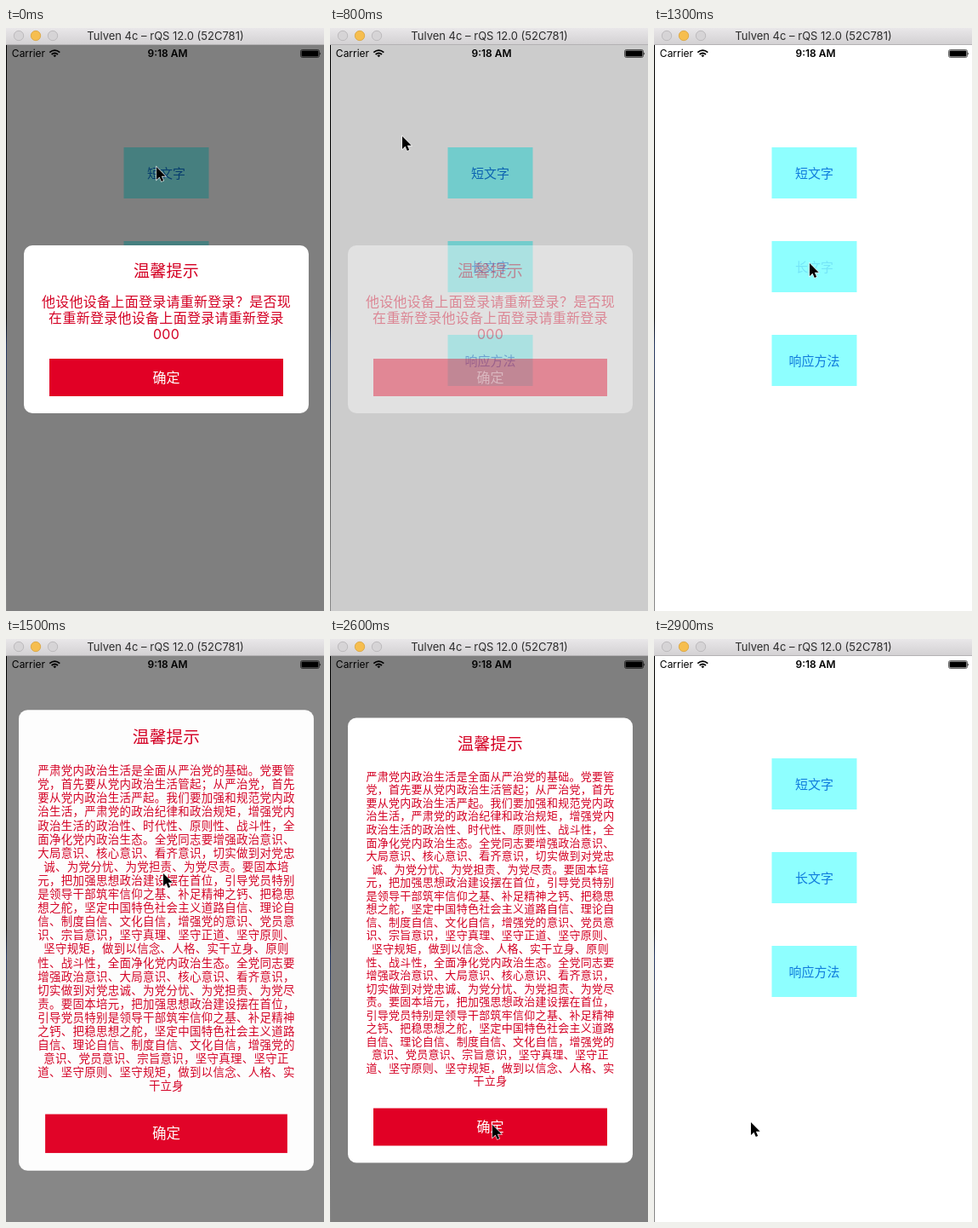
Write an HTML page that moves like this. It is 374x684 px and loops after 3000 ms.

```html
<!DOCTYPE html>
<html lang="zh-CN">
<head>
<meta charset="utf-8">
<style>
  html, body { margin: 0; width: 374px; height: 684px; overflow: hidden; background: #fff; }
  svg { display: block; }
  text { font-family: Inter, "Noto Sans CJK SC", "Noto Sans CJK", sans-serif; text-anchor: middle; }
  .box > * { opacity: var(--alpha); }
</style>
</head>
<body>
<svg id="stage" width="374" height="684" viewBox="0 0 374 684"></svg>
<script>
const LOOP = 3000, STEP = 100, CX = 188.5, CY = 353.5;

const shortText = `他设他设备上面登录请重新登录？是否现
在重新登录他设备上面登录请重新登录
000`;

const longText = `严肃党内政治生活是全面从严治党的基础。党要管
党，首先要从党内政治生活管起；从严治党，首先
要从党内政治生活严起。我们要加强和规范党内政
治生活，严肃党的政治纪律和政治规矩，增强党内
政治生活的政治性、时代性、原则性、战斗性，全
面净化党内政治生态。全党同志要增强政治意识、
大局意识、核心意识、看齐意识，切实做到对党忠
诚、为党分忧、为党担责、为党尽责。要固本培
元，把加强思想政治建设摆在首位，引导党员特别
是领导干部筑牢信仰之基、补足精神之钙、把稳思
想之舵，坚定中国特色社会主义道路自信、理论自
信、制度自信、文化自信，增强党的意识、党员意
识、宗旨意识，坚守真理、坚守正道、坚守原则、
坚守规矩，做到以信念、人格、实干立身、原则
性、战斗性，全面净化党内政治生态。全党同志要
增强政治意识、大局意识、核心意识、看齐意识，
切实做到对党忠诚、为党分忧、为党担责、为党尽
责。要固本培元，把加强思想政治建设摆在首位，
引导党员特别是领导干部筑牢信仰之基、补足精神
之钙、把稳思想之舵，坚定中国特色社会主义道路
自信、理论自信、制度自信、文化自信，增强党的
意识、党员意识、宗旨意识，坚守真理、坚守正
道、坚守原则、坚守规矩，做到以信念、人格、实
干立身`;

const rect = (x, y, w, h, fill, extra = '') =>
  `<rect x="${x}" y="${y}" width="${w}" height="${h}" fill="${fill}" ${extra}/>`;
const label = (str, x, cy, size, fill, extra = '') =>
  `<text x="${x}" y="${cy + size * 0.37}" font-size="${size}" fill="${fill}" ${extra}>${str}</text>`;
const light = (x, fill, stroke) =>
  `<circle cx="${x}" cy="9" r="5.7" fill="${fill}" stroke="${stroke}" stroke-width=".8"/>`;

const button = (str, y, id) =>
  rect(138.5, y, 100, 60, '#8effff') + label(str, CX, y + 30, 15, '#0f7bdc', `id="${id}"`);

function dialog(id, top, text, firstLine, pitch, size) {
  const bottom = 2 * CY - top, red = '#d40024';
  const lines = text.split('\n').map((line, i) =>
    label(line, CX, firstLine + i * pitch, size, red, 'letter-spacing=".28"')).join('');
  return `<g id="${id}" class="box">` +
    rect(21, top, 335, bottom - top, '#fff', 'rx="10"') +
    label('温馨提示', CX, top + 30, 19, red, 'letter-spacing=".2"') + lines +
    rect(51, bottom - 64, 275, 44, '#e10025') +
    label('确定', CX, bottom - 42, 16, '#fff') + '</g>';
}

const stage = document.getElementById('stage');
stage.innerHTML = `
  <defs>
    <linearGradient id="bar" x2="0" y2="1"><stop stop-color="#e9e7e9"/><stop offset="1" stop-color="#d2d0d2"/></linearGradient>
    <linearGradient id="edge" x2="0" y2="1"><stop offset=".48" stop-color="#000"/><stop offset=".53" stop-color="#24365f"/>
      <stop offset=".7" stop-color="#555"/><stop offset="1" stop-color="#888"/></linearGradient>
  </defs>
  ${rect(0, 0, 374, 684, '#fff')}
  ${button('短文字', 140, 'b1')}${button('长文字', 250, 'b2')}${button('响应方法', 360, 'b3')}
  <g id="shade">${rect(1, 20, 373, 664, '#000')}</g>
  ${rect(0, 20, 1, 664, 'url(#edge)')}
  ${rect(0, 0, 374, 20, 'url(#bar)')}${rect(0, 19, 374, 1, '#b4b2b4')}
  ${light(15, '#d6d4d6', '#b5b3b5')}${light(35, '#f6be4f', '#d9a23c')}${light(55, '#d6d4d6', '#b5b3b5')}
  ${label('Tulven 4c – rQS 12.0 (52C781)', 187.5, 9.3, 13, '#2c2c2c')}
  ${label('Carrier', 26.5, 30, 12, '#000')}
  ${label('9:18 AM', 190, 30, 12, '#000', 'font-weight="600"')}
  <g fill="none" stroke="#000" stroke-width="1.7">
    <path d="M51.3 28.6q6-5 12 0M53.6 31q3.7-3 7.4 0"/>
    <path d="M55.4 32.3q1.9-1.5 3.8 0l-1.9 2z" fill="#000" stroke="none"/>
  </g>
  ${rect(346.5, 25.5, 22, 9, 'none', 'rx="2" stroke="#000" stroke-width=".6"')}
  ${rect(347.5, 26.5, 20, 7, '#000', 'rx="1"')}
  <path d="M369.3 28.5q1.8 1.5 0 3.2z"/>
  ${dialog('shortBox', 255, shortText, 321, 19, 16)}
  ${dialog('longBox', 92.5, longText, 161, 15.55, 13)}
  <path id="cursor" d="M1 0v15l3.5-3.3 2.3 5.3 2.4-1-2.3-5.2h4.8z" stroke="#fff" stroke-width="1.2" paint-order="stroke"/>`;

const el = id => document.getElementById(id);
const shade = el('shade'), shortBox = el('shortBox'), longBox = el('longBox');
const cursor = el('cursor'), pressed = el('b2');

// time, x, y of the pointer tip
const path = [
  [0, 176, 163], [50, 176, 163], [400, 190, 395], [660, 190, 395], [800, 84, 127],
  [1200, 182, 276], [1300, 182, 276], [1500, 184, 275], [1900, 194, 549],
  [2200, 190, 570], [2600, 190, 570], [2900, 113, 567], [3000, 113, 567]
];

function ease(t, start, duration) {
  const u = Math.min(1, Math.max(0, (t - start) / duration));
  return u * u * (3 - 2 * u);
}

function pointer(t) {
  const i = path.findIndex(p => p[0] > t);
  const [t0, x0, y0] = path[i - 1], [t1, x1, y1] = path[i];
  const k = ease(t, t0, t1 - t0);
  return [x0 + (x1 - x0) * k, y0 + (y1 - y0) * k];
}

function draw(t) {
  const shortAlpha = 1 - ease(t, 658, 250);
  const grown = ease(t, 1310, 223);
  const longGone = 1 - ease(t, 2610, 250);
  const scale = 1.6 - 0.6 * grown;

  shade.setAttribute('opacity', 0.5 * Math.max(shortAlpha, grown * longGone));
  shortBox.style.setProperty('--alpha', shortAlpha);
  longBox.style.setProperty('--alpha', ease(t, 1310, 205) * longGone);
  longBox.setAttribute('transform', `translate(${CX} ${CY}) scale(${scale}) translate(${-CX} ${-CY})`);
  pressed.setAttribute('opacity', t >= 1300 && t < 1500 ? 0.2 : 1);
  cursor.setAttribute('transform', `translate(${pointer(t)})`);
}

function tick() {
  draw(Math.floor(performance.now() % LOOP / STEP) * STEP);
  requestAnimationFrame(tick);
}
tick();
</script>
</body>
</html>
```
